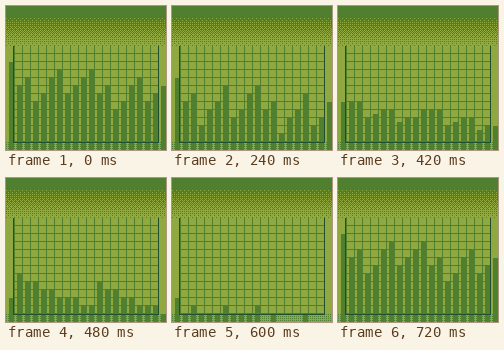
An HTML page with a canvas for the animation above (750 ms loop, 160x144 px).

```html
<!DOCTYPE html>
<html lang="en">
<head>
<meta charset="utf-8">
<title>Equalizer</title>
<style>
html, body { margin: 0; width: 100%; height: 100%; overflow: hidden; background: #8fa83f; }
canvas { display: block; width: 160px; height: 144px; image-rendering: pixelated; }
</style>
</head>
<body>
<canvas id="stage" width="160" height="144"></canvas>
<script>
const ctx = document.getElementById('stage').getContext('2d');
const LIGHT = '#8fa83f', MID = '#507f30', DARK = '#204f30';
const W = 160, H = 144, CELL = 8, TOP = 40, BASE = 136;
const LOOP = 750, STEP = 60;

// Shape of the spectrum at each beat: floor, sawtooth height, tilt
const BEATS = [
  { floor: 5, saw: 1, tilt: 0.13 },
  { floor: 4.5, saw: 0, tilt: 0.45 },
  { floor: 2.2, saw: 1.3, tilt: 0.12 },
  { floor: 2.2, saw: 1.2, tilt: 0.1 },
  { floor: 4.6, saw: 0, tilt: -0.42 },
  { floor: 0, saw: 0.2, tilt: 0 }
];

function rect(x, y, w, h, color) {
  ctx.fillStyle = color;
  ctx.fillRect(x, y, w, h);
}

// Ordered 4x4 threshold
function bayer(x, y) {
  const bit = n => 2 * ((x ^ y) >> n & 1) + (y >> n & 1);
  return (4 * bit(0) + bit(1) + 0.5) / 16;
}

function dither(y0, y1, color, density) {
  for (let y = y0; y < y1; y++)
    for (let x = 0; x < W; x++)
      if (bayer(x, y) < density(y)) rect(x, y, 1, 1, color);
}

function backdrop() {
  rect(0, 0, W, H, LIGHT);
  rect(0, 0, W, TOP, MID);
  dither(12, TOP, LIGHT, y => (y - 10) / 32);
  dither(BASE, H, MID, () => 0.25);
}

function grid() {
  for (let x = 8; x < 152; x += CELL) rect(x, TOP, 1, BASE - TOP, MID);
  for (let y = TOP + 7; y < BASE; y += CELL) rect(8, y, 144, 1, MID);
}

function axes() {
  rect(7, TOP, 1, BASE - TOP + 1, DARK);
  rect(152, TOP, 1, BASE - TOP + 1, DARK);
  rect(7, BASE, 146, 1, DARK);
}

function level(beat, col) {
  const { floor, saw, tilt } = BEATS[beat % BEATS.length];
  return Math.round(floor + saw * ((col + 2) % 4) + tilt * col);
}

// Ten columns repeat across the stage, each repeat one cell lower.
function bars(step) {
  const beat = step >> 1, mix = step % 2 / 2;
  for (let k = 0; k < W / CELL; k++) {
    const col = (k + 9) % 10, drop = Math.floor((k - 1) / 10);
    const from = level(beat, col), to = level(beat + 1, col);
    const top = BASE - CELL * (from + (to - from) * mix - drop);
    if (top < H) rect(k * CELL + 3, top, 5, H - top, MID);
  }
}

function frame(now) {
  backdrop();
  grid();
  bars(Math.floor(now % LOOP / STEP));
  axes();
  requestAnimationFrame(frame);
}
frame(0);
</script>
</body>
</html>
```
